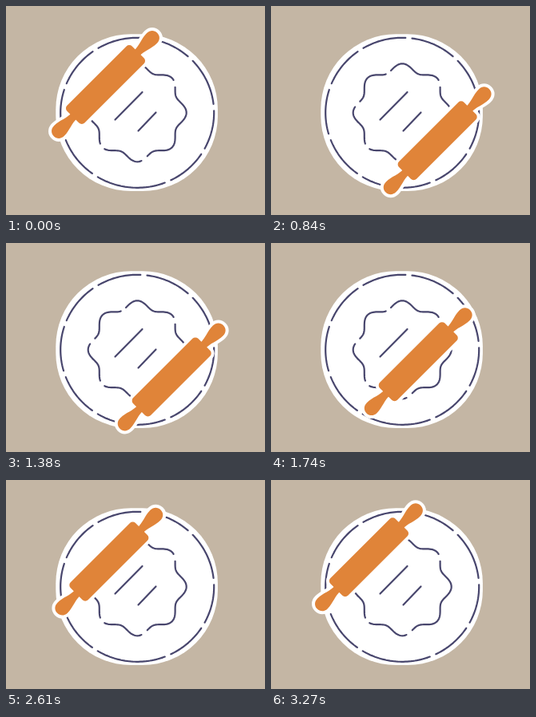
Animation, 324 px wide and 262 px high, one loop 3300 ms. Source, as an HTML page:

```html
<!DOCTYPE html>
<html lang="en">
<head>
<meta charset="utf-8">
<title>Rolling pin</title>
<style>
  html, body { margin: 0; width: 100%; height: 100%; overflow: hidden; background: #c4b6a4; }
  svg { display: block; width: 100%; height: 100%; }
  .ink { fill: none; stroke: #48466d; stroke-width: 2.2; stroke-linecap: round; stroke-linejoin: round; }
  .edge { fill: #fff; stroke: #fff; stroke-width: 8; stroke-linejoin: round; }
  .wood { fill: #e08439; }
</style>
</head>
<body>
<svg viewBox="0 0 324 262">
  <defs>
    <g id="shape">
      <rect x="-57.5" y="-15.5" width="115" height="31" rx="5"/>
      <path id="handle" d="M55 -5 C64 -4 72 -9 82 -9 C88 -9 91.5 -5 91.5 0 C91.5 5 88 9 82 9 C72 9 64 4 55 5 Z"/>
      <use href="#handle" transform="scale(-1 1)"/>
    </g>
  </defs>
  <rect x="62.3" y="35.3" width="202.6" height="196.7" rx="94" fill="#fff"/>
  <path id="rim" class="ink"/>
  <path id="dough" class="ink"/>
  <path class="ink" d="M136.5 142.5 L170.5 108 M165.5 156.5 L187.5 133.5"/>
  <g id="pin">
    <use href="#shape" class="edge"/>
    <use href="#shape" class="wood"/>
  </g>
</svg>
<script>
  const $ = id => document.getElementById(id);
  const RAD = Math.PI / 180;

  // Outline around the plate's centre, broken at the given angles (degrees, clockwise from the right).
  function dashes(radius, gaps, half) {
    return gaps.map((gap, i) => {
      const from = gap + half;
      const to = (gaps[i + 1] ?? gaps[0] + 360) - half;
      const n = Math.ceil((to - from) / 1.5);
      const points = Array.from({ length: n + 1 }, (_, k) => {
        const a = (from + (to - from) * k / n) * RAD, r = radius(a);
        return (164.2 + r * Math.cos(a)).toFixed(2) + ' ' + (133.8 + r * Math.sin(a)).toFixed(2);
      });
      return 'M' + points.join('L');
    }).join('');
  }

  $('rim').setAttribute('d', dashes(
    a => 95 + Math.cos(2 * a), [-160, -123.5, -85, -45.6, -4, 30.5, 66, 124, 161.5], 2.5));
  $('dough').setAttribute('d', dashes(
    a => 57 + 4.5 * Math.cos(8 * a), [-169, -109, -38, 81, 136], 4));

  // The pin eases down across the plate, then returns at a steady pace and rests briefly.
  const LOOP = 3300, TURN = 1125, REST_END = 2970;
  const LOW = 112.5, SPAN = 112;
  const rise = t => LOW + SPAN * (1 - Math.cos(Math.PI * t / 1560)) / 2;
  const fall = t => Math.max(LOW, 223.5 - 0.0637 * t);

  function pinX(t) {
    if (t < TURN) return rise(t + LOOP - REST_END);
    return t < REST_END ? fall(t - TURN) : rise(t - REST_END);
  }

  function draw(now) {
    const x = pinX(now % LOOP);
    const y = 128.3 + (x - 160) * 0.84;
    $('pin').setAttribute('transform', `translate(${x.toFixed(2)} ${y.toFixed(2)}) rotate(-45)`);
  }

  const start = performance.now();
  function tick() {
    draw(performance.now() - start);
    requestAnimationFrame(tick);
  }
  tick();
</script>
</body>
</html>
```
